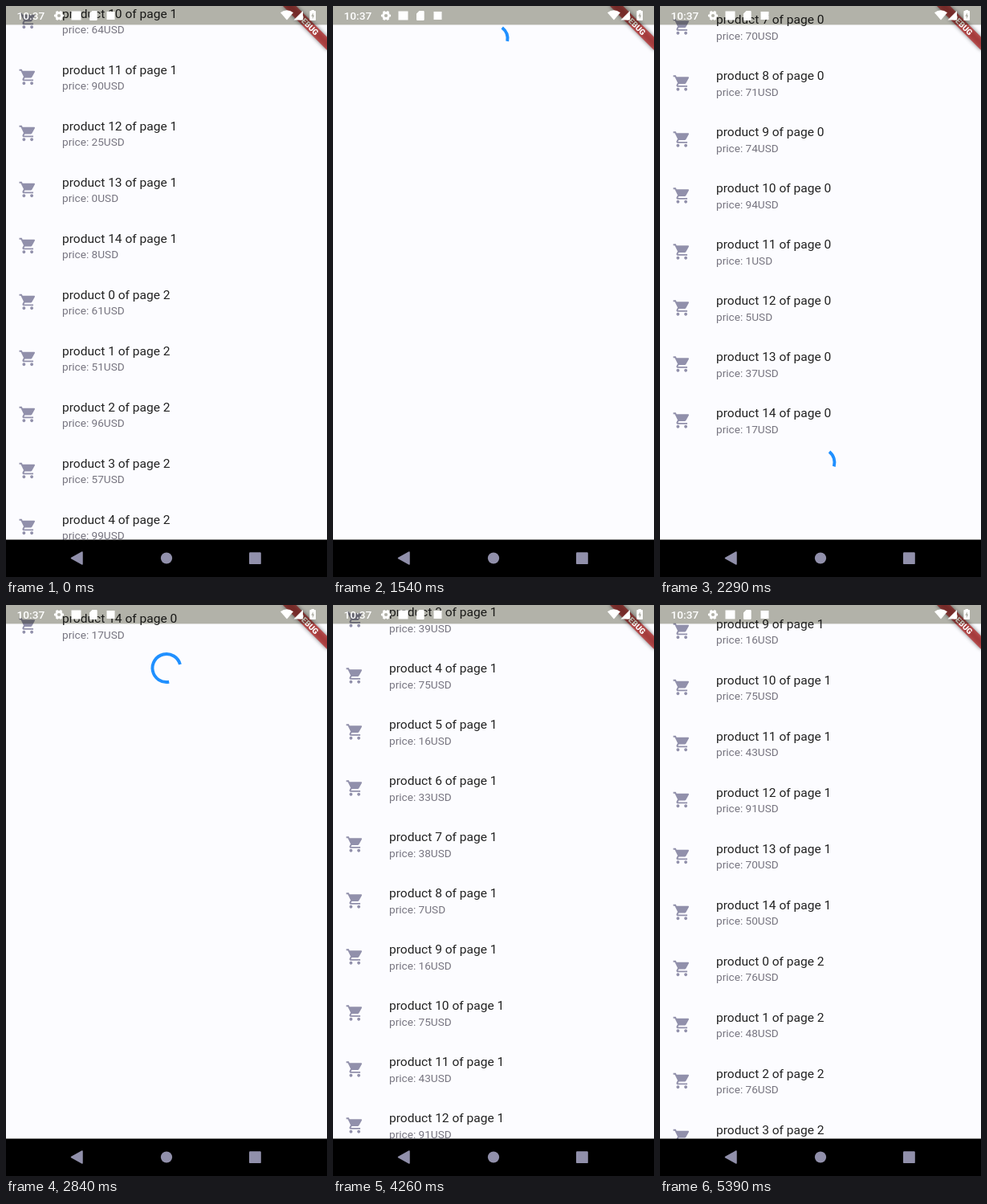
An HTML page that plays this animation: 400 px wide and 711 px high, repeating every 6.31 s.

```html
<!DOCTYPE html>
<html lang="en">
<head>
<meta charset="utf-8">
<style>
  html, body { margin: 0; width: 100%; height: 100%; overflow: hidden; background: #fcfcff; }
  svg { display: block; width: 400px; height: 711px; font-family: Roboto, sans-serif; }
  .title { font-size: 15.56px; fill: #222; }
  .price { font-size: 13.61px; fill: #777580; }
  .cart, .nav { fill: #9190ab; }
  .scrim { fill: #b4b4a9; mix-blend-mode: multiply; }
  .clock { font-size: 13.6px; font-weight: 500; }
  .debug { font-size: 9.9px; font-weight: 900; fill: #fff; text-anchor: middle; }
</style>
</head>
<body>
<svg viewBox="0 0 400 711">
  <defs>
    <path id="cart" d="M7 18c-1.1 0-1.99.9-1.99 2S5.9 22 7 22s2-.9 2-2-.9-2-2-2zM1 2v2h2l3.6 7.59-1.35 2.45c-.16.28-.25.61-.25.96 0 1.1.9 2 2 2h12v-2H7.42c-.14 0-.25-.11-.25-.25l.03-.12.9-1.63h7.45c.75 0 1.41-.41 1.75-1.03l3.58-6.49c.08-.14.12-.31.12-.48 0-.55-.45-1-1-1H5.21l-.94-2H1zm16 16c-1.1 0-1.99.9-1.99 2s.89 2 1.99 2 2-.9 2-2-.9-2-2-2z"/>
    <filter id="blur" x="-20%" y="-100%" width="140%" height="300%"><feGaussianBlur stdDeviation="2.6"/></filter>
  </defs>
  <rect width="400" height="711" fill="#fcfcff"/>
  <g id="content">
    <path id="spinner" fill="none" stroke="#2090ff" stroke-width="3.9"/>
  </g>

  <g transform="translate(400 0) rotate(45)">
    <rect x="-39" y="27.2" width="78" height="11.7" opacity=".5" filter="url(#blur)"/>
    <rect x="-39" y="27.2" width="78" height="11.7" fill="#b71c1c" fill-opacity=".68"/>
    <text class="debug" x="0" y="36.6">DEBUG</text>
  </g>

  <rect class="scrim" width="400" height="23.4"/>
  <g fill="#fff">
    <text class="clock" x="13.6" y="17">10:37</text>
    <g fill="none" stroke="#fff">
      <circle cx="66" cy="12" r="3.5" stroke-width="2.8"/>
      <circle cx="66" cy="12" r="5.2" stroke-width="1.8" pathLength="12" stroke-dasharray="1 1" stroke-dashoffset=".5"/>
    </g>
    <rect x="81.5" y="6.5" width="12" height="11"/>
    <path d="M107.5 6h5a1.2 1.2 0 0 1 1.2 1.2v9.6a1.2 1.2 0 0 1-1.2 1.2h-7.3a1.2 1.2 0 0 1-1.2-1.2V9.500z"/>
    <rect x="125.500" y="7" width="10" height="10"/>
    <path d="M342 8.200Q350 2.200 358 8.200L350 17.500z"/>
    <path d="M370 6v11.500h-11.500z"/>
    <path fill-rule="evenodd" d="M380.500 6v-1h3.400v1h1.300a.8.8 0 0 1 .8.8v10.400a.8.8 0 0 1-.8.8h-6a.8.8 0 0 1-.8-.8V6.800a.8.8 0 0 1 .8-.8zm2.300 2.200-2.500 4.600h1.600v3.400l2.400-4.800h-1.500z"/>
  </g>

  <rect y="664.5" width="400" height="46.500"/>
  <g class="nav">
    <path d="M81.500 687.500L95 680v15z" stroke="#9190ab" stroke-width="1.500" stroke-linejoin="round"/>
    <circle cx="200" cy="687.500" r="7.100"/>
    <rect x="303" y="680.300" width="14.800" height="14.800" rx="1.200"/>
  </g>
</svg>
<script>
const LOOP = 6310, ROW = 70, TOP = 23.3, PER_PAGE = 15, ROWS = 45;
const content = document.getElementById('content');
const spinner = document.getElementById('spinner');

// Known prices start at the given row; other rows get a scattered value.
const prices = (seed, known) => Array.from({ length: ROWS }, (_, i) => {
  for (const [first, values] of known)
    if (i >= first && i < first + values.length) return values[i - first];
  return (i * 37 + seed) % 100;
});
const before = prices(11, [[25, [64, 90, 25, 0, 8, 61, 51, 96, 57, 99]]]);
const after = prices(46, [
  [7, [70, 71, 74, 94, 1, 5, 37, 17]],
  [18, [39, 75, 16, 33, 38, 7, 16, 75, 43, 91, 70, 50, 76, 48, 76]],
]);

function buildList(values) {
  const list = document.createElementNS('http://www.w3.org/2000/svg', 'g');
  list.innerHTML = values.map((price, i) => `
    <g transform="translate(0 ${i * ROW})">
      <use class="cart" href="#cart" transform="translate(15.56 23.3) scale(.972)"/>
      <text class="title" x="70" y="31.1">product ${i % PER_PAGE} of page ${Math.floor(i / PER_PAGE)}</text>
      <text class="price" x="70" y="50.6">price: ${price}USD</text>
    </g>`).join('');
  content.prepend(list);
  return list;
}
const oldList = buildList(before), newList = buildList(after);

// Moments at which the screen repaints: [first, last, count].
const repaints = [
  [0, 0, 1], [30, 620, 13], [820, 1260, 8], [1540, 1660, 2],
  [1800, 2290, 9], [2340, 2410, 2], [2460, 2840, 7], [2910, 3060, 4],
  [3110, 3110, 1], [3330, 3330, 1], [4060, 4260, 3], [4410, 4600, 3],
  [4670, 5020, 5], [5080, 5200, 3], [5390, 5390, 1],
].flatMap(([first, last, count]) => Array.from({ length: count },
  (_, i) => first + (last - first) * i / Math.max(1, count - 1)));

const speedUp = p => u => u ** p;
const slowDown = p => u => 1 - (1 - u) ** p;

// Scroll moves: [start, end, from, to, easing].
const moves = [
  [10, 640, 1789.8, 820, slowDown(2)],
  [790, 1260, 820, 0, slowDown(1.2)],
  [1770, 2110, 0, 119, speedUp(1.6)],
  [2110, 2290, 119, 522.3, slowDown(1.1)],
  [2290, 2410, 522.3, 701, slowDown(1.1)],
  [2410, 3090, 701, 1052.8, slowDown(2.16)],
  [4010, 4260, 1052.8, 1300.3, speedUp(1.6)],
  [4260, 5080, 1300.3, 1705.8, slowDown(3.18)],
];

function scrollAt(t) {
  const [start, end, from, to, ease] = moves.findLast(m => t >= m[0]) || moves[0];
  const u = Math.min(1, Math.max(0, (t - start) / (end - start)));
  return from + (to - from) * ease(u);
}

// cubic-bezier(.4, 0, .2, 1)
function fastOutSlowIn(x) {
  let lo = 0, hi = 1;
  for (let i = 0; i < 20; i++) {
    const s = (lo + hi) / 2, r = 1 - s;
    if (1.2 * r * r * s + .6 * r * s * s + s ** 3 < x) lo = s; else hi = s;
  }
  return 3 * (1 - lo) * lo * lo + lo ** 3;
}

function arcPath(cy, age) {
  const u = age / 1333 % 1;
  const head = fastOutSlowIn(Math.min(1, 2 * u));
  const tail = fastOutSlowIn(Math.max(0, 2 * u - 1));
  const start = -90 + 270 * tail + 360 * age / 2222 + 90 * u;
  const sweep = Math.max(1, 270 * (head - tail));
  const point = deg => {
    const a = deg * Math.PI / 180;
    return `${200 + 17.5 * Math.cos(a)} ${cy + 17.5 * Math.sin(a)}`;
  };
  return `M${point(start)}A17.5 17.5 0 ${sweep > 180 ? 1 : 0} 1 ${point(start + sweep)}`;
}

// Rows loaded and the birth time of the spinner below them.
function stateAt(t) {
  if (t < 1540) return [ROWS, 0];
  if (t < 1660) return [0, 1375];
  if (t < 3330) return [15, 2120];
  if (t < 5390) return [30, 4180];
  return [ROWS, 5390];
}

function draw(now) {
  const t = repaints.findLast(r => r <= now % LOOP + .01) || 0;
  const [loaded, born] = stateAt(t);
  const top = TOP - scrollAt(t);
  const fresh = t >= 1540;
  oldList.style.display = fresh ? 'none' : '';
  newList.style.display = fresh ? '' : 'none';
  const list = fresh ? newList : oldList;
  list.setAttribute('transform', `translate(0 ${top})`);
  [...list.children].forEach((row, i) => {
    const y = top + i * ROW;
    row.style.display = i < loaded && y > -ROW && y < 665 ? '' : 'none';
  });
  spinner.setAttribute('d', arcPath(top + loaded * ROW + 17.5, t - born));
}

const began = performance.now();
function tick() {
  draw(performance.now() - began);
  requestAnimationFrame(tick);
}
tick();
</script>
</body>
</html>
```
